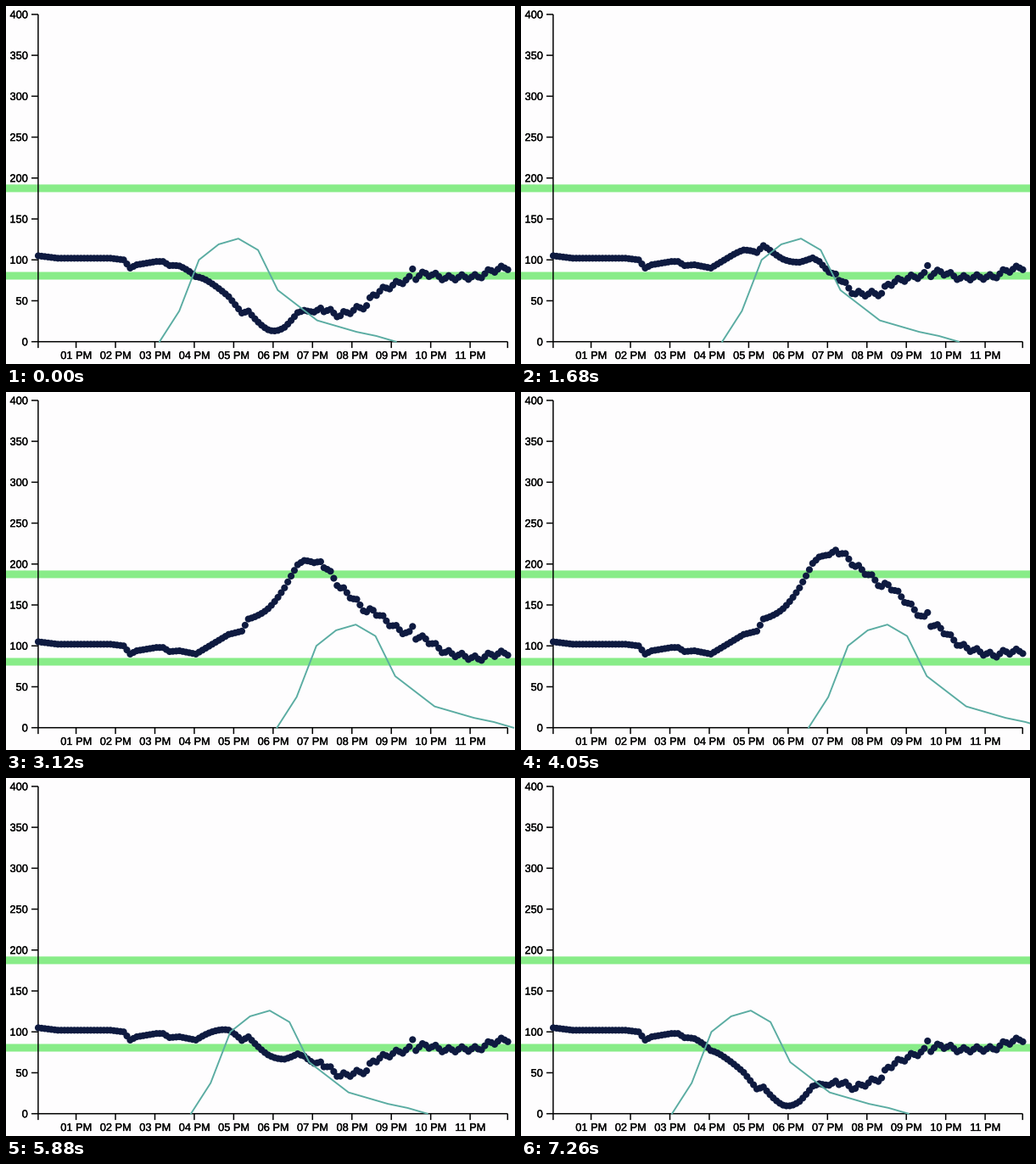
A matplotlib script that plays this animation: 600 by 422 pixels, repeating every 7.29 s.

```python
import numpy as np
import matplotlib.pyplot as plt
from matplotlib.animation import FuncAnimation
from matplotlib.collections import EllipseCollection
from matplotlib.patheffects import withStroke

W, H, DPI = 600, 422, 100
PX = 72 / DPI                      # points per pixel
FRAMES, STEP = 243, 30
LEFT, RIGHT, BASE = 37.9, 591.3, 395.7
HOUR, ONE_PM = 46.45, 82.6
NAVY, TEAL, GREEN, INK, PAPER = "#0e1a40", "#5aaca2", "#88ec88", "#000000", "#fefdfe"

plt.rcParams["font.family"] = "Liberation Sans"


def x_of(hour):
    return ONE_PM + (np.asarray(hour) - 1) * HOUR


def hour_at(x):
    return (x - ONE_PM) / HOUR + 1


def y_of(value):
    return BASE - np.asarray(value) * 0.9645


def knots(*pairs):
    return np.array(pairs, dtype=float).T


# Glucose every five minutes: a trend through key points, with a late ripple
TREND = knots((0, 105), (6, 102), (22, 102), (26, 100), (28, 90), (30, 94),
              (36, 98), (38, 98), (40, 93), (43, 94), (48, 90), (58, 114),
              (62, 118), (64, 132), (70, 134), (75, 138), (79, 146), (81, 142),
              (84, 128), (86, 124), (92, 87), (96, 79), (100, 75), (102, 84),
              (113, 88), (114, 99), (115, 88), (118, 90), (124, 80), (134, 79),
              (138, 87), (143, 91))
index = np.arange(144)
ripple = np.where(index > 86, 3 * np.cos((index - 105) * np.pi / 2), 0)
readings = np.interp(index, *TREND) + ripple
dot_x = 38 + index * HOUR / 12
dot_hour = hour_at(dot_x)

# Insulin activity by hours after the dose
ACTIVITY = knots((0, 0), (.5, 37.5), (1, 100), (1.5, 119), (2, 126), (2.5, 112),
                 (3, 63), (4, 26), (5, 12), (5.5, 7), (6, 0))
LAG, SENSITIVITY = 0.25, 0.595

grid = np.linspace(0, 6, 721)
act = np.interp(grid, *ACTIVITY)
used = np.concatenate([[0], np.cumsum((act[1:] + act[:-1]) / 2)]) * grid[1]


def drop(dose):
    return SENSITIVITY * np.interp(dot_hour - dose - LAG, grid, used)


undosed = readings + drop(hour_at(265))

# Drag path of the dose: frame number, x position
DRAG = knots((0, 181), (32, 212), (76, 265), (100, 313), (130, 343),
             (135, 339), (150, 312), (169, 265), (196, 218), (242, 178))
SLOPE = np.gradient(DRAG[1], DRAG[0])


def dose_x(t):
    """Smooth cubic path through the drag points."""
    times, xs = DRAG
    k = int(np.clip(np.searchsorted(times, t, "right") - 1, 0, len(times) - 2))
    span = times[k + 1] - times[k]
    u = (t - times[k]) / span
    return ((1 + 2 * u) * (1 - u) ** 2 * xs[k]
            + u * (1 - u) ** 2 * span * SLOPE[k]
            + u * u * (3 - 2 * u) * xs[k + 1]
            + u * u * (u - 1) * span * SLOPE[k + 1])


fig = plt.figure(figsize=(W / DPI, H / DPI), dpi=DPI, facecolor=PAPER)
ax = fig.add_axes([0, 0, 1, 1])
ax.set_xlim(0, W)
ax.set_ylim(H, 0)
ax.axis("off")


def rule(xs, ys):
    ax.plot(xs, ys, color=INK, lw=1.5 * PX, solid_capstyle="butt",
            snap=False, zorder=2)


def label(x, y, text, align):
    ax.text(x, y, text, fontsize=12.8 * PX, color=INK, ha=align,
            va="baseline", zorder=2,
            path_effects=[withStroke(linewidth=0.3 * PX, foreground=INK)])


for middle in (214.9, 318):
    ax.fill_between([0, W], middle - 4.5, middle + 4.5, color=GREEN, lw=0,
                    snap=False, zorder=1)

rule([LEFT, LEFT], [y_of(400), BASE])
rule([LEFT, RIGHT], [BASE, BASE])
for value in range(0, 401, 50):
    y = y_of(value)
    rule([30, LEFT], [y, y])
    label(25.8, y + 4.5, str(value), "right")
for x in (LEFT, RIGHT, *x_of(np.arange(1, 12))):
    rule([x, x], [BASE, BASE + 7.4])
for hour in range(1, 12):
    label(x_of(hour), 416, f"{hour:02d} PM", "center")

size = np.full(len(dot_x), 8.1)
dots = EllipseCollection(size, size, np.zeros(len(dot_x)), units="x",
                         offsets=np.column_stack([dot_x, y_of(readings)]),
                         offset_transform=ax.transData,
                         facecolors=NAVY, edgecolors="none", zorder=3)
ax.add_collection(dots)
curve, = ax.plot([], [], color=TEAL, lw=1.9 * PX, zorder=4)


def draw(frame):
    x = dose_x(frame)
    dots.set_offsets(np.column_stack([dot_x, y_of(undosed - drop(hour_at(x)))]))
    curve.set_data(x + ACTIVITY[0] * HOUR, y_of(ACTIVITY[1]))
    return dots, curve


anim = FuncAnimation(fig, draw, frames=FRAMES, interval=STEP,
                     repeat=True, repeat_delay=0, blit=False)
plt.show()
```
